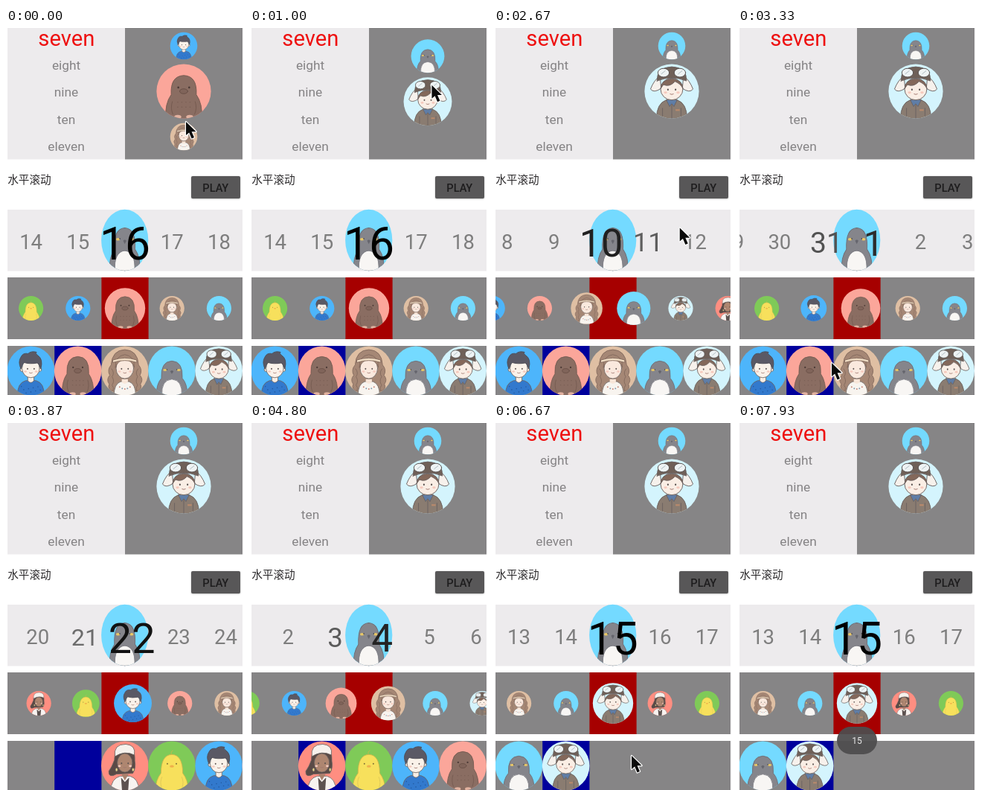
An HTML page with a canvas for the animation above (8070 ms loop, 320 by 493 pixels).

```html
<!DOCTYPE html>
<html lang="zh">
<head>
<meta charset="utf-8">
<title>Pickers</title>
<style>
html, body { margin: 0; width: 100%; height: 100%; overflow: hidden; background: #fff; }
canvas { display: block; width: 320px; height: 493px; }
</style>
</head>
<body>
<canvas id="stage"></canvas>
<script>
const W = 320, H = 493, LOOP = 8070, STEP = 200 / 3;
const CELL = 63.2, MID = 160;
const LIGHT = '#edebed', GREY = '#868586', INK = '#6b6361';
const canvas = document.getElementById('stage');
const dpr = window.devicePixelRatio || 1;
canvas.width = W * dpr;
canvas.height = H * dpr;
const c = canvas.getContext('2d');

const mod = (a, n) => ((a % n) + n) % n;
const clamp = v => Math.max(0, Math.min(1, v));
const ease = (t, start, length) => (1 - Math.cos(Math.PI * clamp((t - start) / length))) / 2;

function rect(x, y, w, h, fill) {
  c.fillStyle = fill;
  c.fillRect(x, y, w, h);
}

function oval(x, y, rx, ry, fill, line) {
  c.beginPath();
  c.ellipse(x, y, rx, ry, 0, 0, 7);
  if (fill) { c.fillStyle = fill; c.fill(); }
  if (line) { c.strokeStyle = line; c.stroke(); }
}

function shape(d, fill, line) {
  const p = new Path2D(d);
  if (fill) { c.fillStyle = fill; c.fill(p); }
  if (line) { c.strokeStyle = line; c.stroke(p); }
}

function pair(x, y, rx, ry, fill, line) {
  oval(-x, y, rx, ry, fill, line);
  oval(x, y, rx, ry, fill, line);
}

function write(text, x, y, size, fill, weight = 400, align = 'center') {
  c.font = `${weight} ${size}px Roboto, "Noto Sans CJK SC", "Noto Sans CJK", sans-serif`;
  c.textAlign = align;
  c.fillStyle = fill;
  c.fillText(text, x, y);
}

function inside(x, y, w, h, draw) {
  c.save();
  c.beginPath();
  c.rect(x, y, w, h);
  c.clip();
  draw();
  c.restore();
}

function face(y, rx, ry, skin) {
  oval(0, y, rx, ry, skin, INK);
  pair(14, y + 2, 3, 3.5, '#5b5250');
  pair(23, y + 13, 6, 4, '#f5c9bd');
  shape(`M-6 ${y + 18}Q0 ${y + 22} 6 ${y + 18}`, null, '#a0766e');
}

// Each portrait lives in a circle of radius 100.
const portraits = [
  { back: '#ff8e81', draw() {
    shape('M-36 34Q-70 52-68 22Q-54 4-44-24Q-46-72 4-74Q46-70 42-20Q48 8 34 30Z', '#5a4a46', INK);
    shape('M-60 100Q-58 52-20 42H22Q58 52 60 100Z', '#f7f3f0', INK);
    shape('M-14 34L0 60L16 34Z', '#a9816c');
    shape('M-16 48L0 66L18 48L14 100H-12Z', '#5d5250');
    face(-12, 32, 38, '#ae8670');
    shape('M-42-38Q-50-88 4-88Q48-84 40-44Q0-64-42-38Z', '#f6f1ec', INK);
    pair(35, 16, 5, 7, '#f5df8a', INK);
  } },
  { back: '#7fca58', draw() {
    shape('M-70 100Q-68 56-46 30Q-46-44 0-46Q46-44 46 30Q68 56 70 100Z', '#f7e05c', '#cdb64b');
    shape('M-2-46Q-6-58 4-62', null, '#cdb64b');
    pair(19, -8, 3, 3, '#7a6c35');
    oval(0, 2, 9, 5, '#f0b04a');
    shape('M-42 46Q-52 66-44 86M42 46Q52 66 44 86', null, '#dcc557');
  } },
  { back: '#4db5fb', draw() {
    shape('M-56 100Q-58 50-22 40H22Q58 50 56 100Z', '#3279cd', INK);
    for (let i = 0; i < 9; i++) oval(-40 + i * 10, 64 + (i * 13) % 30, 2.4, 2.4, '#22599f');
    shape('M-13 24V40Q0 56 13 40V24Z', '#f8eee5', INK);
    pair(38, -6, 7, 9, '#f8eee5', INK);
    face(-10, 37, 38, '#faf2ea');
    shape('M-42-8Q-56-36-42-56Q-34-74-12-70Q2-82 24-76Q18-70 28-64Q54-48 42-8Q36-26 28-32Q-6-26-30-34Q-38-22-42-8Z', '#5a5965', '#4b4952');
  } },
  { back: '#fba69a', draw() {
    shape('M-66 100Q-70 46-46 12Q-50-56 0-58Q50-56 46 12Q70 46 66 100Z', '#8a6d62', '#745a50');
    pair(20, -14, 3.5, 3.5, '#493834');
    oval(0, 0, 15, 9, '#80645a', '#674e45');
    shape('M-42 38Q-50 62-40 84M42 38Q50 62 40 84', null, '#745a50');
    for (let i = 0; i < 8; i++) oval(-22 + (i % 4) * 15, 40 + Math.floor(i / 4) * 18, 2.5, 2, '#7a5f55');
    pair(22, 94, 13, 7, '#e2b2a0');
  } },
  { back: '#dfbfa3', draw() {
    shape('M-48 84Q-76 76-66 54Q-80 36-64 18Q-76-4-58-24Q-54-84 0-86Q54-84 58-24Q76-4 64 18Q80 36 66 54Q76 76 48 84Z', '#a58775', '#80675b');
    shape('M-46 100Q-46 54-18 44H18Q46 54 46 100Z', '#f8f4ef', INK);
    shape('M-13 34V46Q0 58 13 46V34Z', '#f8e6d9');
    face(-10, 37, 42, '#fae9de');
    shape('M-40-14Q-42-60 0-66Q42-60 40-14Q30-42 0-46Q-30-42-40-14Z', '#a58775', '#80675b');
    shape('M-50-44Q0-60 50-44V-34Q0-50-50-34Z', '#f2dfc6', '#80675b');
    shape('M-56-8Q-42 8-54 24Q-42 42-54 58Q-44 70-50 80M56-8Q42 8 54 24Q42 42 54 58Q44 70 50 80', null, '#80675b');
    for (let i = -2; i < 3; i++) oval(i * 11, 74 - i * i * 2, 3, 3, i % 2 ? '#7f9aae' : '#c98476');
  } },
  { back: '#74daff', draw() {
    shape('M-64 100Q-68 56-44 30Q-48-38 0-40Q48-38 44 30Q68 56 64 100Z', '#85858b', '#6c6c74');
    shape('M-42 100Q-46 38 0 34Q46 38 42 100Z', '#f8f6f4', '#7b7b82');
    pair(29, -3, 8, 4.5, '#e8c766');
    pair(21, -5, 2.5, 2.5, '#4b4b52');
    shape('M-7 2Q0-5 7 2L0 13Z', '#65656d');
  } },
  { back: '#d4f4fd', draw() {
    shape('M-56 100Q-56 44-20 32H20Q56 44 56 100Z', '#8a7c71', INK);
    shape('M-20 32L-8 56L0 46L8 56L20 32Z', '#5f7da6', INK);
    shape('M0 52V100M-34 62V90M34 62V90', null, INK);
    rect(14, 66, 15, 6, '#b98a6c');
    shape('M-44-56Q-66-40-78-8Q-66 8-40-10ZM44-56Q66-40 78-8Q66 8 40-10Z', '#f6f1ec', INK);
    face(-8, 41, 40, '#faeee5');
    shape('M-41-10Q-40-42 0-46Q40-42 41-10Q32-28 12-36Q-8-14-30-24Z', '#84685a', INK);
    shape('M-54-38Q-56-88 0-90Q56-88 54-38Q0-60-54-38Z', '#6f6058', INK);
    pair(30, -68, 21, 16, '#eef3f4', '#56504d');
    shape('M-38-64L-24-75M24-64L38-75', null, '#a9b7bc');
  } }
];

function portrait(i, x, y, rx, ry = rx) {
  const who = portraits[i];
  c.save();
  c.translate(x, y);
  c.scale(rx / 100, ry / 100);
  c.lineWidth = 2.6;
  c.lineCap = c.lineJoin = 'round';
  oval(0, 0, 100, 100, who.back);
  c.clip();
  who.draw();
  c.restore();
}

// Visits the items near the centre with their distance and closeness to it.
function around(pos, visit) {
  const first = Math.round(pos) - 4;
  for (let k = first; k < first + 9; k++) visit(k, k - pos, clamp(1 - Math.abs(k - pos)));
}

function topPickers(t) {
  rect(2, 0, 158, 176.5, LIGHT);
  rect(160, 0, 158, 176.5, GREY);
  write('seven', 81.3, 24, 29.2, '#ee1111');
  ['eight', 'nine', 'ten', 'eleven'].forEach((word, i) => write(word, 81, 56 + i * 36.4, 17.3, '#858385'));

  const pos = 3 + 3 * ease(t, 70, 1130);
  inside(160, 0, 158, 176.5, () => around(pos, (k, d, near) => {
    if (portraits[k]) portrait(k, 239, 85 + d * 61, 18.3 + 18.3 * near);
  }));
}

function heading() {
  write('水平滚动', 2.2, 209.3, 14.6, '#2c2a2c', 400, 'left');
  c.save();
  c.shadowColor = 'rgba(0,0,0,.35)';
  c.shadowBlur = 2 * dpr;
  c.shadowOffsetY = dpr / 2;
  c.fillStyle = '#585758';
  c.beginPath();
  c.roundRect(249, 199, 66, 30, 2);
  c.fill();
  c.restore();
  write('PLAY', 281.8, 219.5, 14.6, '#1d1c1d', 500);
}

function numberRow(t) {
  rect(2, 244, 316, 82.5, LIGHT);
  portrait(5, 159.7, 285, 31.6, 41.2);
  const pos = 16 - 63 * ease(t, 1690, 5000);
  inside(2, 244, 316, 82.5, () => around(pos, (k, d, near) => {
    const size = 27.5 + 33 * near;
    const shade = Math.round(126 * (1 - near));
    write(mod(k - 1, 31) + 1, MID + d * CELL, 287 + 2.5 * near + size * 0.355, size, `rgb(${shade},${shade},${shade})`);
  }));
}

function faceRow(t) {
  rect(2, 335, 316, 83, GREY);
  rect(128.4, 335, CELL, 83, '#a60000');
  const pos = 3 - 39 * ease(t, 1692, 4000);
  inside(2, 335, 316, 83, () => around(pos, (k, d, near) => {
    portrait(mod(k, 7), MID + d * CELL, 376.5, 16.6 + 10.6 * near);
  }));
}

function dragRow(t) {
  rect(2, 427, 316, 66, GREY);
  rect(65.2, 427, CELL, 66, '#00009c');
  const pos = 3 - 4 * ease(t, 3390, 460) + ease(t, 3950, 380) + 6 * ease(t, 5300, 900);
  inside(2, 427, 316, 66, () => portraits.forEach((p, i) => {
    portrait(i, 96.6 + (i - pos) * CELL, 460.5, 31.8, 33);
  }));
}

function toast(t) {
  c.save();
  c.globalAlpha = clamp((t - 6940) / 330);
  c.fillStyle = 'rgba(78,77,78,.94)';
  c.beginPath();
  c.roundRect(133, 408, 54, 37, 18.5);
  c.fill();
  write('15', 160, 431, 12, '#e9e9e9');
  c.restore();
}

// Pointer strokes: start time, end time, from x, y, to x, y.
const strokes = [
  [0, 120, 242, 126, 242, 126],
  [900, 1600, 242, 70, 291, 208],
  [1600, 2400, 291, 208, 291, 208],
  [2400, 3200, 291, 208, 126, 450],
  [3200, 3400, 126, 450, 126, 450],
  [5850, 6930, 185, 447, 185, 447]
];

function pointer(t) {
  const s = strokes.find(s => t >= s[0] && t < s[1]);
  if (!s) return;
  const p = ease(t, s[0], s[1] - s[0]);
  c.save();
  c.translate(s[2] + (s[4] - s[2]) * p, s[3] + (s[5] - s[3]) * p);
  c.lineWidth = 2.4;
  c.lineJoin = 'round';
  const arrow = 'M0 0V18L4.2 14.4L7.6 22.5L11 21L7.6 13.2H13.5Z';
  shape(arrow, null, '#fff');
  shape(arrow, '#0b0b0b');
  c.restore();
}

function draw(now) {
  const t = Math.floor(((now % LOOP) + 5) / STEP) * STEP;
  c.setTransform(dpr, 0, 0, dpr, 0, 0);
  rect(0, 0, W, H, '#fff');
  topPickers(t);
  heading();
  numberRow(t);
  faceRow(t);
  dragRow(t);
  toast(t);
  pointer(t);
}

let begin = null;
function tick(now) {
  if (begin === null) begin = now;
  draw(now - begin);
  requestAnimationFrame(tick);
}
draw(0);
requestAnimationFrame(tick);
</script>
</body>
</html>
```
